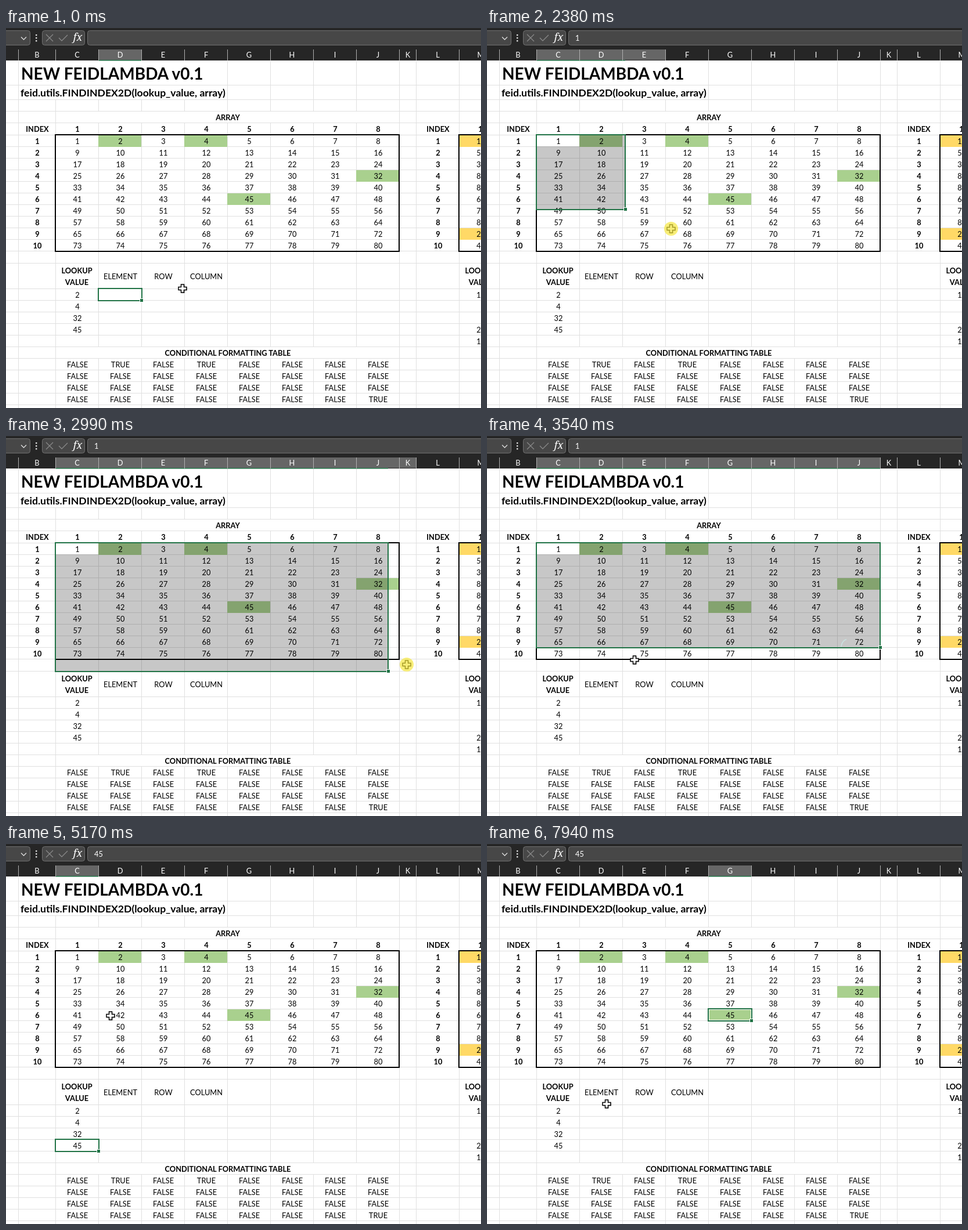
Recreate the animation shown at these times as an HTML page. Size 818 px wide and 655 px high, loop 8 s.

```html
<!DOCTYPE html>
<html lang="en">
<head>
<meta charset="utf-8">
<title>Spreadsheet</title>
<style>
html, body { margin: 0; width: 100%; height: 100%; overflow: hidden; background: #fff; }
svg { display: block; width: 100%; height: 100%; }
text { font: 12.8px Lato, "Open Sans", sans-serif; fill: #000; white-space: pre; }
text.b { font-weight: 700; }
text.w { fill: #fff; }
.crisp { shape-rendering: crispEdges; }
</style>
</head>
<body>
<svg id="stage" viewBox="0 0 818 655"></svg>
<script>
const LOOP = 8000, TICK = 77;
const GREEN = '#217346', HIT = '#a9d08e', GOLD = '#ffd966';
const hits = [2, 4, 32, 45];

// column 0 is C, row 0 is the first row of the array
const colX = c => c > 8 ? 706 : 85 + 74 * c;
const rowY = r => r < 11 ? 184 + 20 * r : r === 11 ? 405 : 449 + 20 * (r - 12);
const cellAt = (x, y) => [
  Math.floor((x - 85) / 74),
  y < 405 ? Math.floor((y - 184) / 20) : y < 449 ? 11 : 12 + Math.floor((y - 449) / 20)
];
const valueAt = (c, r) => r < 10 ? r * 8 + c + 1 : c === 0 ? hits[r - 12] : '';

const rect = (x, y, w, h, fill, more = '') =>
  `<rect x="${x}" y="${y}" width="${w}" height="${h}" fill="${fill}" ${more}/>`;
const path = (d, stroke, width = 1, more = '') =>
  `<path d="${d}" fill="none" stroke="${stroke}" stroke-width="${width}" ${more}/>`;
const text = (s, x, mid, cls = '', anchor = 'middle', more = '') =>
  `<text x="${x}" y="${mid + 5}" class="${cls}" text-anchor="${anchor}" ${more}>${s}</text>`;

function gridLines() {
  let d = '';
  const h = y => d += `M0 ${y + .5}H818`;
  const v = (x, a, b) => d += `M${x + .5} ${a}V${b}`;
  [98, 123, 143, 163].forEach(h);
  for (let r = 0; r <= 22; r++) h(rowY(r));
  [21, 677, 706, 780].forEach(x => v(x, 56, 655));
  for (let c = 0; c < 8; c++) {
    const x = colX(c);
    v(x, c < 4 ? 123 : 56, c ? 143 : 655);
    if (c) { v(x, 163, 549); v(x, 570, 655); }
  }
  return path(d, '#e0e0e0');
}

function fills() {
  let s = '';
  for (const n of hits) {
    const i = n - 1;
    s += rect(colX(i % 8), rowY(i >> 3) + 1, 74, 20, HIT);
  }
  for (const r of [0, 8]) s += rect(780, rowY(r) + 1, 40, 20, GOLD);
  const border = 'stroke="#000" stroke-width="2"';
  return s + rect(85, 184, 592, 201, 'none', border) + rect(780, 184, 60, 201, 'none', border);
}

function labels() {
  let s = text('NEW FEIDLAMBDA v0.1', 26, 84, 'b', 'start', 'style="font-size:28px"')
    + text('feid.utils.FINDINDEX2D(lookup_value, array)', 25, 112.5, 'b', 'start', 'style="font-size:17.6px"')
    + text('ARRAY', 382, 154, 'b') + text('CONDITIONAL FORMATTING TABLE', 382, 560, 'b');
  for (const [x, first] of [[54, 122], [744, 817]]) {
    s += text('INDEX', x, 174, 'b') + text('LOOKUP', first, 418, 'b') + text('VALUE', first, 438, 'b');
    for (let r = 0; r < 10; r++) s += text(r + 1, x, 195 + 20 * r, 'b');
  }
  s += text(1, 817, 174, 'b');
  for (let c = 0; c < 8; c++) {
    const x = colX(c) + 38;
    s += text(c + 1, x, 174, 'b');
    for (let r = 0; r < 10; r++) {
      const n = valueAt(c, r);
      s += text(n, x, 195 + 20 * r);
      if (r < 4) s += text(hits.includes(n) ? 'TRUE' : 'FALSE', x, 580 + 20 * r);
    }
  }
  ['ELEMENT', 'ROW', 'COLUMN'].forEach((w, i) => s += text(w, 197 + 74 * i, 428));
  hits.forEach((n, i) => s += text(n, 123, 460 + 20 * i));
  [...'1538867824'].forEach((n, r) => s += text(n, 814, 195 + 20 * r));
  return s + text(1, 814, 460) + text(2, 814, 520) + text(1, 814, 540);
}

function toolbar() {
  const box = (x, w) => rect(x + .5, 4.5, w, 25, '#474747', 'rx="4" stroke="#707070"');
  return rect(0, 0, 818, 37, '#262626') + box(-20, 61) + box(62, 73) + box(140, 700)
    + path('M26 15.5l4.5 4.5 4.5-4.5', '#ddd', 1.3)
    + [11, 16, 21].map(y => rect(51, y, 2.4, 2.4, '#ddd')).join('')
    + path('M69 11l12 12M81 11l-12 12M91 17l5 5 10-10', '#888', 1.3)
    + '<text x="123.5" y="22" text-anchor="middle" class="w" style="font:italic 18px \'Noto Serif\',serif">fx</text>';
}

function header() {
  let lines = '', letters = '';
  [...'BCDEFGHIJKLM'].forEach((name, i) => {
    const left = i ? i < 11 ? colX(i - 1) : 780 : 21;
    const right = i < 10 ? colX(i) : i === 10 ? 780 : 854;
    lines += `M${left + .5} 37V56`;
    letters += text(name, (left + right) / 2 + .5, 46, 'w');
  });
  return path(lines, '#b0b0b0', 1, 'class="crisp"') + letters;
}

const cross = 'M-2.5-7h5v4.5h4.5v5h-4.5v4.5h-5v-4.5h-4.5v-5h4.5z';
document.getElementById('stage').innerHTML =
  rect(0, 0, 818, 655, '#fff') +
  `<g class="crisp">${gridLines()}${fills()}</g>` +
  '<path id="shade" fill="#000" fill-opacity=".22" fill-rule="evenodd" class="crisp"/>' +
  labels() +
  `<g class="crisp">${rect(0, 0, 0, 0, 'none', 'id="inner" stroke="#fff"')}` +
  rect(0, 0, 0, 0, 'none', `id="frame" stroke="${GREEN}" stroke-width="2"`) +
  rect(0, 0, 6, 6, GREEN, 'id="knob" stroke="#fff"') + '</g>' +
  toolbar() + rect(0, 37, 818, 19, '#262626') +
  rect(0, 37, 0, 18, '#666', 'id="heads"') + rect(0, 55, 0, 1.5, GREEN, 'id="under"') +
  header() + text('', 152, 17, 'w', 'start', 'id="formula"') +
  path('M610 363Q611 353 619 350.5', '#c9e2e0', 1.8, 'id="ripple"') +
  `<g id="cursor"><path d="${cross}" transform="translate(1 1)" fill="#0005"/>` +
  `<path d="${cross}" fill="#fff" stroke="#000" stroke-width="1.5"/></g>` +
  '<circle id="halo" r="12" fill="#f4e63a" fill-opacity=".68"/>';

// pointer moves: leave, arrive, x, y, sideways bow of the path
const moves = [
  [1309, 1771, 112, 203, -1.36], [2210, 2387, 317, 346, .4], [2387, 2447, 538, 381],
  [2618, 2772, 590, 388], [2849, 3003, 690, 394], [3080, 3234, 622, 363],
  [3388, 3542, 254, 386], [3600, 3696, 124, 462],
  ...[1, 2, 3].map(i => [3850 + 308 * i, 3927 + 308 * i, 125, 460 + 20 * i]),
  [5005, 5159, 180, 296], [5159, 5544, 203, 195], [5929, 6083, 345, 196],
  [6237, 6468, 501, 273], [6468, 6622, 664, 250], [7007, 7238, 418, 296],
  [7392, 7623, 311, 407], [7623, 7931, 206, 448, -.25]
];
// one long drag, then single clicks
const presses = [[2150, 3388],
  ...[3696, 4235, 4543, 4851, 5860, 6083, 6853, 7238].map(t => [t, t + 150])];
const LEAD = 184, LAG = 40, SAMPLES = 16;

const el = id => document.getElementById(id);
const set = (id, o) => { for (const k in o) el(id).setAttribute(k, o[k]); };
const show = (id, on) => set(id, { visibility: on ? 'visible' : 'hidden' });
const block = (x, y, x2, y2) => `M${x} ${y}H${x2}V${y2}H${x}Z`;

function pointer(t) {
  let x = 304, y = 449;
  for (const [leave, arrive, x1, y1, bow = 0] of moves) {
    if (t <= leave) break;
    const f = Math.min(1, (t - leave) / (arrive - leave)), e = f * (2 - f);
    const cx = (x + x1) / 2 - (y1 - y) * bow, cy = (y + y1) / 2 + (x1 - x) * bow;
    const bend = (a, c, b) => (1 - e) ** 2 * a + 2 * e * (1 - e) * c + e * e * b;
    [x, y] = [bend(x, cx, x1), bend(y, cy, y1)];
  }
  return [x, y];
}

// first and last cell picked at a moment
function picked(t) {
  const press = presses.filter(p => p[0] - LEAD <= t).pop();
  if (!press) return [1, 12, 1, 12];
  const [from, to] = press;
  return [...cellAt(...pointer(from)), ...cellAt(...pointer(Math.max(from, Math.min(t, to))))];
}

// the frame glides: it is the mean of the recent picks
function glide(t) {
  const sum = [0, 0, 0, 0];
  for (let i = 0; i < SAMPLES; i++) {
    const [a, b, c, d] = picked(t - 10 * i);
    [colX(a), rowY(b), colX(c + 1), rowY(d + 1)].forEach((v, k) => sum[k] += v / SAMPLES);
  }
  return sum.map(Math.round);
}

function draw(ms) {
  const t = Math.floor((ms + 15) / TICK) * TICK;
  const [x, y, x2, y2] = glide(t - LAG);
  const [c0, r0, c1] = picked(t - LAG);
  const many = x2 - x > 76 || y2 - y > 46;
  set('frame', { x, y, width: x2 - x + (many ? 0 : 1), height: y2 - y + 1 });
  set('inner', { x: x + 1.5, y: y + 1.5, width: x2 - x - 2, height: y2 - y - 2 });
  show('inner', !many);
  set('knob', { x: x2 - 2.5, y: y2 - 2.5 });

  let d = '';
  if (many) {
    const ax = Math.max(x, colX(c0)), ay = Math.max(y, rowY(r0));
    const bx = Math.min(x2, colX(c0 + 1)), by = Math.min(y2, rowY(r0 + 1));
    d = block(x, y, x2, y2);
    if (bx > ax && by > ay) d += block(ax, ay, bx, by);
  }
  set('shade', { d });

  const left = colX(c0), right = colX(c1 + 1);
  set('heads', { x: left, width: right - left });
  set('under', { x: left, width: Math.min(right, Math.max(x2, left + 74)) - left });
  el('formula').textContent = valueAt(c0, r0);

  const [px, py] = pointer(t).map(Math.round);
  set('cursor', { transform: `translate(${px} ${py})` });
  set('halo', { cx: px, cy: py });
  show('halo', presses.some(([a, b]) => t >= a && t < b));
  show('ripple', t > 3388 && t < 3566);
}

const start = performance.now();
function tick() {
  draw((performance.now() - start) % LOOP);
  requestAnimationFrame(tick);
}
tick();
</script>
</body>
</html>
```
